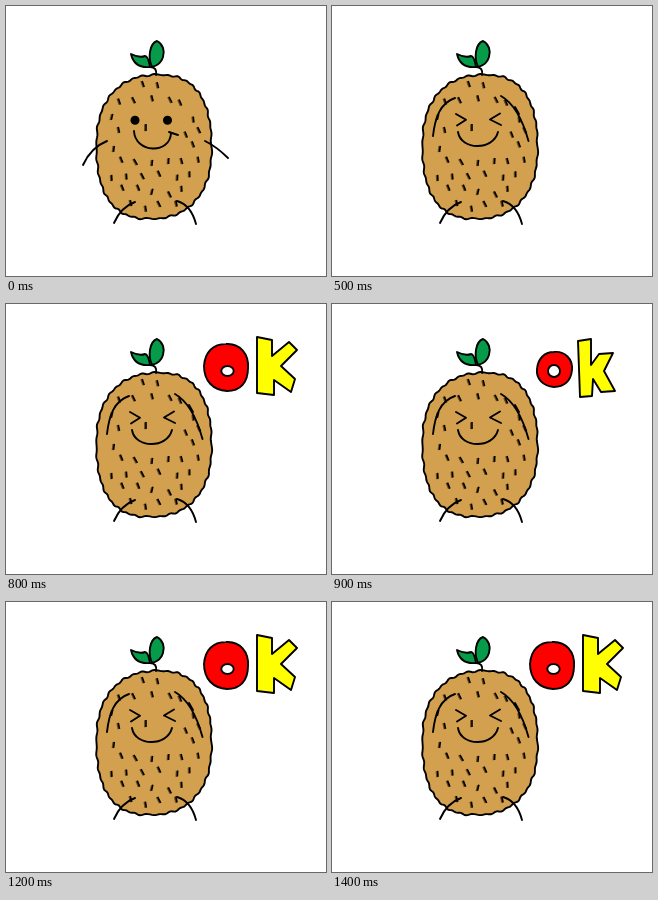
These frames come from a looping animation (320x270 px, 1500 ms). An HTML page:

```html
<!DOCTYPE html>
<html lang="en">
<head>
<meta charset="utf-8">
<title>OK potato</title>
<style>
  html, body { margin: 0; width: 100%; height: 100%; overflow: hidden; background: #fff; }
  svg { display: block; width: 320px; height: 270px; }
  .line { fill: none; stroke: #000; stroke-width: 1.9; stroke-linecap: round; stroke-linejoin: round; }
  .skin { fill: #d2a04f; }
  .leaf { fill: #069b48; }
  .red { fill: #f00; }
  .yellow { fill: #ff0; }
  .white { fill: #fff; }
  .mark { stroke-width: 1.6; stroke-linecap: butt; }
  .shade { stroke: #6b4a20; }

  .pose { visibility: hidden; animation: 1.5s step-end infinite; }
  .down { animation-name: down; }
  .wave { animation-name: wave; }
  .calm { animation-name: calm; }
  .glee { animation-name: glee; }
  .word { animation: word 1.5s step-end infinite; }
  .large, .small { animation-name: pulse; }
  .small { animation-delay: .1s; }

  @keyframes down { 0% { visibility: visible } 13.33%, 100% { visibility: hidden } }
  @keyframes wave { 0%, 33.33%, 100% { visibility: hidden } 13.33% { visibility: visible } }
  @keyframes calm { 0% { visibility: visible } 33.33%, 100% { visibility: hidden } }
  @keyframes glee { 0% { visibility: hidden } 33.33%, 100% { visibility: visible } }
  @keyframes word { 0% { opacity: 0 } 39.99%, 100% { opacity: 1 } }
  /* The two sizes take turns: the small one runs the same pulse a beat later. */
  @keyframes pulse {
    0%, 46.66%, 60%, 73.33%, 86.66% { visibility: hidden }
    39.99%, 53.33%, 66.66%, 80%, 93.33%, 100% { visibility: visible }
  }
</style>
</head>
<body>
<svg viewBox="0 0 320 270">
  <g class="line">
    <path id="body" class="skin"/>
    <path id="shade" class="mark shade" transform="translate(-1.1 .3)"/>
    <path id="marks" class="mark"/>

    <path d="M144 61C149 61 151 64 150 69"/>
    <path class="leaf" d="M144 61C143 55 141 50 139 50C134 52 129 50 125 48C127 57 133 62 144 61Z"/>
    <path class="leaf" d="M146 61C142 52 143 38 151 35C157 38 159 45 157 51C155 58 150 60 146 61Z"/>
    <path d="M129 196Q115 201 108 217M171 195Q185 199 190 218"/>

    <path class="pose down" d="M101 135C91 139 82 148 77 159M199 135C207 139 216 146 222 152"/>
    <path class="pose wave" d="M99 152C87 148 77 138 72 126M199 152C211 148 221 138 227 126"/>

    <g class="pose calm">
      <path d="M128 125C129 147 164 149 165 127M163 126L172 129"/>
      <circle cx="129" cy="114.3" r="3.6" fill="#000"/>
      <circle cx="161.5" cy="114.3" r="3.6" fill="#000"/>
    </g>

    <g class="pose glee">
      <path d="M123 92C108 97 103 112 101 130M169 90C183 98 191 115 196.5 135M183 101L187 108"/>
      <path d="M124 108L134 113.8L125 119.5M168 107.5L158 113.5L169 119"/>
      <path d="M126 126C129 144.5 161 145 166 126"/>
    </g>

    <g class="word">
      <g class="pose small">
        <path class="red" d="M222 48C233 47 241 55 240 66C239 77 232 83 222 83C211 82 204 75 205 65C206 55 212 48 222 48Z"/>
        <ellipse class="white" cx="222" cy="67" rx="6" ry="6"/>
        <path class="yellow" d="M246 37L259 35L259 61L267 50L281 49L272 67L283 87L269 88L261 75L260 92L248 93Z"/>
      </g>
      <g class="pose large">
        <path class="red" d="M220 40C234 39 243 50 242 64C242 79 234 87 221 87C207 86 198 77 198 62C199 48 207 40 220 40Z"/>
        <ellipse class="white" cx="221.5" cy="67" rx="6.2" ry="5"/>
        <path class="yellow" d="M251 33L266 36L266 52L283 38L291 46L275 62L289 75L285 88L268 76L268 91L251 89Z"/>
      </g>
    </g>
  </g>
</svg>
<script>
  const cx = 148, cy = 140.8, rx = 57.5, ry = 72, power = 2.4;
  const setPath = (id, d) => document.getElementById(id).setAttribute("d", d);
  const round = v => Math.sign(v) * Math.abs(v) ** (2 / power);

  // Superellipse, leaning right at the top, with a hand-drawn wobble.
  function rim(t) {
    const wobble = 1 + 0.008 * Math.sin(38 * t) + 0.005 * Math.sin(23 * t);
    const u = round(Math.cos(t)), v = round(Math.sin(t));
    return [cx + rx * u * wobble - 4 * v ** 3, cy + ry * v * wobble];
  }
  const outline = Array.from({ length: 360 }, (_, i) => rim(i * Math.PI / 180));
  setPath("body", "M" + outline.join("L") + "Z");

  let seed = 11;
  const random = () => (seed = seed * 16807 % 2147483647) / 2147483647;
  const spread = size => (random() - 0.5) * size;

  const inSkin = (x, y) => Math.abs((x - cx) / (rx - 7)) ** power + Math.abs((y - cy) / (ry - 6)) ** power < 1;
  const inFace = (x, y) => Math.abs(x - 146) < 32 && Math.abs(y - 124) < 22;

  // Staggered rows of short marks, left out around the face.
  let marks = "M140 118v7";
  for (let row = 0; row < 9; row++) {
    for (let col = 0; col < 8; col++) {
      const x = 92 + 15.5 * (col + row % 2 / 2) + spread(6);
      const y = 80 + 15 * row + spread(7);
      const lean = 1 + spread(5);
      if (inSkin(x, y) && !inFace(x, y)) marks += `M${x - lean / 2} ${y - 3}l${lean} 6`;
    }
  }
  setPath("shade", marks);
  setPath("marks", marks);
</script>
</body>
</html>
```
